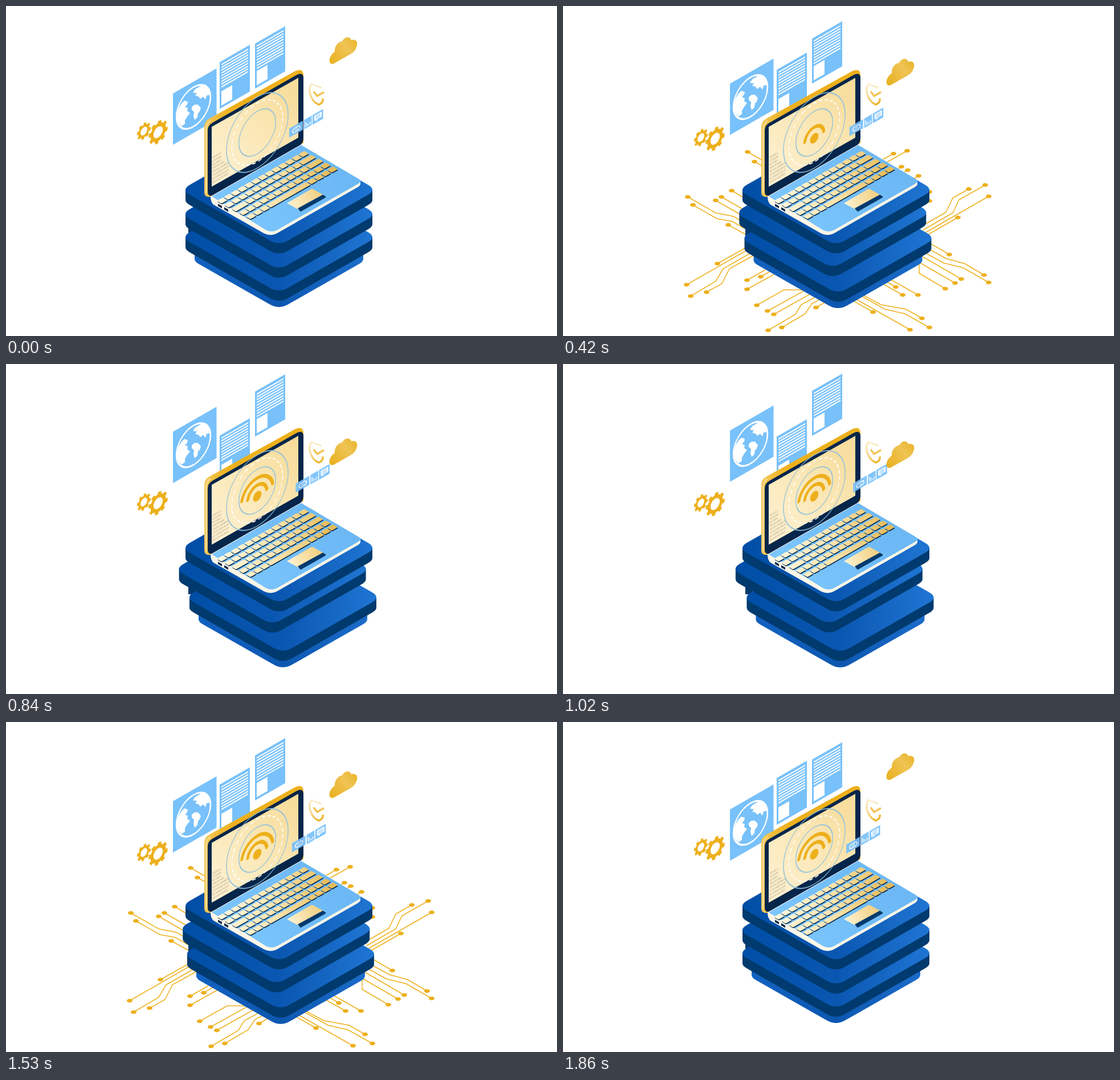
Write an HTML page that moves like this. It is 967x579 px and loops after 1890 ms.

```html
<!DOCTYPE html>
<html lang="en">
<head>
<meta charset="utf-8">
<title>Isometric laptop</title>
<style>
  html, body { margin: 0; width: 100%; height: 100%; overflow: hidden; background: #fff; }
  svg { display: block; width: 967px; height: 579px; }
  .code { font: 5px "Liberation Mono", "DejaVu Sans Mono", monospace; fill: #a89d80; }
</style>
</head>
<body>
<svg id="stage" viewBox="0 0 967 579" xmlns="http://www.w3.org/2000/svg"></svg>
<script>
const LOOP = 1890, STEP = 30, PEAK = 960, END = 1860;
const GOLD = '#edb01c', SKY = '#78c1fa', NAVY = '#003a6e', INK = '#05254a';
const ISO = 'matrix(.866 -.5 0 1 ';   // upright plane facing left

const range = n => [...Array(n).keys()];
const group = (id, body) => `<g id="${id}">${body}</g>`;
const path = (d, fill, more = '') => `<path d="${d}" fill="${fill}" ${more}/>`;
const line = (d, color, width, more = '') =>
  path(d, 'none', `stroke="${color}" stroke-width="${width}" ${more}`);
const rect = (x, y, w, h, fill) =>
  `<rect x="${x}" y="${y}" width="${w}" height="${h}" fill="${fill}"/>`;
const iso = (x, y, body) => `<g transform="${ISO}${x} ${y})">${body}</g>`;
const slant = (x, y, body) => `<g transform="matrix(1 -.574 0 1 ${x} ${y})">${body}</g>`;
const ring = (r, color, width, more = '') =>
  `<circle r="${r}" fill="none" stroke="${color}" stroke-width="${width}" ${more}/>`;

function gradient(id, x1, y1, x2, y2, ...colors) {
  const stops = colors.map((c, i) =>
    `<stop offset="${i / (colors.length - 1)}" stop-color="${c}"/>`).join('');
  return `<linearGradient id="${id}" gradientUnits="userSpaceOnUse" x1="${x1}" y1="${y1}" x2="${x2}" y2="${y2}">${stops}</linearGradient>`;
}

const defs = '<defs>' +
  gradient('face', 316, 0, 644, 0, '#004ea6', '#0a57b2', '#2075d3') +
  gradient('foot', 331, 0, 627, 0, '#1261c0', '#0d57b0', '#1c6cca') +
  gradient('screen', 361, 300, 513, 150, '#fdf1d2', '#fbe8b8', '#f7dc9b') +
  gradient('lid', 348, 0, 400, 0, '#f3c95c', '#efb933', GOLD) +
  gradient('deck', 400, 380, 560, 260, '#7cc6fd', '#6cb8f5') +
  gradient('keys', 380, 0, 570, 0, '#fff6dc', '#f9e3ad', '#e6bb58') +
  gradient('pad', 494, 350, 556, 322, '#fff3d2', '#eecb79') +
  gradient('cloud', 568, 98, 614, 62, '#e9b120', '#ecba3a', '#efc455', '#eab72f') +
  gradient('shield', 535, 136, 552, 174, '#fbeecb', '#f5d890', GOLD) +
  '</defs>';

// Rounded rhombus face on a side wall of height t.
function slab(cy, t, w, h, face, side) {
  const c = 479, r = 16, k = r * h / w, l = c - w, e = c + w;
  const top = `M${l + r},${cy + k}Q${l},${cy} ${l + r},${cy - k}L${c - r},${cy - h + k}` +
    `Q${c},${cy - h} ${c + r},${cy - h + k}L${e - r},${cy - k}Q${e},${cy} ${e - r},${cy + k}` +
    `L${c + r},${cy + h - k}Q${c},${cy + h} ${c - r},${cy + h - k}Z`;
  const b = cy + t, m = r / 2;
  const wall = `M${l + m},${cy}V${b}Q${l + m},${b + k / 2} ${l + r},${b + k}L${c - r},${b + h - k}` +
    `Q${c},${b + h} ${c + r},${b + h - k}L${e - r},${b + k}Q${e - m},${b + k / 2} ${e - m},${b}V${cy}Z`;
  return path(wall, side) + path(top, face);
}
const plate = cy => slab(cy, 18, 172, 98, 'url(#face)', NAVY);

// Each wire starts with its terminal dot.
const westWires = ['219,335 268,363 299,369 314,378', '228,349 270,373 297,378 320,391',
  '268,341 322,372', '278,335 322,360', '296,324 322,339', '290,384 328,405',
  '324,256 352,272', '336,273 352,282'];
const southWestWires = ['217,489 332,423', '224,509 268,483 281,461 332,432',
  '252,502 279,487 292,461 334,438', '271,452 328,420', '323,481 355,463', '347,475 368,463',
  '323,497 388,461', '340,525 388,498 428,498', '359,535 428,497', '370,541 438,503',
  '360,569 408,541 418,524 448,508', '384,564 425,540 437,522 460,510', '444,529 465,517'];
const southEastWires = ['544,537 505,515', '609,568 510,512', '643,564 600,540 565,532 522,508',
  '630,548 602,532 558,524 526,507', '623,507 568,476', '596,507 552,482', '584,493 560,479',
  '671,496 625,469 625,446', '688,486 622,448', '699,479 628,438',
  '747,485 702,459 668,451 630,430', '739,472 705,452 672,443 636,423', '678,436 640,414'];
const northEastWires = ['747,334 630,401', '741,314 695,340 684,363 632,393',
  '712,321 684,337 672,362 630,386', '693,371 632,406', '604,254 556,281', '580,259 542,280',
  '594,282 580,290', '605,288 590,297', '624,298 606,308', '643,326 630,333', '643,342 630,349'];

function wire(points) {
  const [x, y] = points.split(/[ ,]/);
  return line('M' + points, GOLD, 1.5) + `<ellipse cx="${x}" cy="${y}" rx="5" ry="3.3" fill="${GOLD}"/>`;
}

function gear(x, y, r) {
  const teeth = range(8).map(i =>
    `<rect x="${-r * .18}" y="${-r}" width="${r * .36}" height="${r * .4}" fill="${GOLD}" transform="rotate(${i * 45 + 10})"/>`);
  return iso(x, y, ring(r * .65, GOLD, r * .32) + teeth.join(''));
}

function page(x, y, h) {
  const rows = range(9).map(i => rect(3, 5 + i * 4.9, 47, 2.2, '#fff')).join('');
  return slant(x, y, rect(0, 0, 53, h, SKY) + rows + rect(3, h - 29, 19, 25, '#fff'));
}

const globe = slant(293, 153.5, rect(0, 0, 76.5, 90, SKY)) +
  iso(329, 177, ring(34.5, '#fff', 3)) +
  path('M299,190L303,179 308,171 313,166 319,168 318,173 314,177 319,179 318,184 323,188 318,194 314,201 314,207 308,211Q299,204 299,190Z' +
    'M328,152L332,146 342,140 350,138Q358,145 357,156L352,157 350,164 346,159 341,163 338,159 332,157 335,153Z' +
    'M326,177L331,173 337,173 342,179 340,185 337,188 336,195 331,200 329,193 330,186 326,182Z', '#fff');

const lid =
  path('M348,327V212Q348,203 356,198L508,114Q522,108 522,122V240L364,334Q348,338 348,327Z', 'url(#lid)') +
  line('M351.5,328V214Q352,206 359,201', '#fbe9bd', 1.5) +
  path('M354,325V218Q354,210 362,205L510,121Q522,115 522,127V232Q522,241 514,246L364,332Q354,336 354,325Z', INK) +
  path('M361,212L513,126V231L361,317Z', 'url(#screen)');

const bits = ['101011', '110100', '011001', '10010100', '10101100010', '11010001010', '01100010110', '01010101001']
  .map((s, i) => iso(362, 268 + i * 6.2, `<text class="code">${s}</text>`)).join('');

const rings = iso(441, 222,
  ring(62.4, '#8fc0dd', 1.8, 'opacity=".85"') +
  ring(51.5, '#fff', 1.8, 'stroke-dasharray="7 5"') +
  ring(37.3, '#93c3da', 1.8, 'opacity=".9"'));

function arc(r, deg) {
  const a = deg * Math.PI / 180, x = r * Math.cos(a), y = -r * Math.sin(a);
  return iso(441, 232, line(`M${-x},${y}A${r},${r} 0 0 1 ${x},${y}`, GOLD, 6, 'stroke-linecap="round"'));
}
const wifi = group('dot', iso(441, 232, `<circle r="8.5" fill="${GOLD}"/>`)) +
  group('inner', arc(19.5, 8)) + group('outer', arc(32, 12));

// Key widths per row, counted in units.
const ones = n => Array(n).fill(1);
const keyRows = [ones(13), [...ones(11), 2], [2, ...ones(9), 2], ones(13), [...ones(3), 6, ...ones(4)]];
function keyboard() {
  let out = '';
  keyRows.forEach((row, r) => {
    let n = 0;
    for (const w of row) {
      const x = 371.5 + r * 12.7 + n * 11.9, y = 341 + r * 6.8 - n * 6.8;
      const u = w * 11.9 - 4, k = u * .571;
      const d = `l${u},${-k}q1.2,-.4 2.4,.2l5.4,3.1q1.5,1 0,1.8l${-u},${k}q-1.2,.5 -2.4,0l-5.4,-3.3q-1.4,-1 0,-1.8z`;
      out += path(`M${x + .8},${y + 1.5}${d}`, INK) + path(`M${x},${y}${d}`, 'url(#keys)');
      n += w;
    }
  });
  return out;
}

const deck =
  path('M359,334L518,243 622,305V312Q622,315 617,318L477,398Q465,405 453,399L365,349Q359,345 359,334Z', '#fbf6e8') +
  path('M361,334L518,244 620,304Q625,308 618,312L476,393Q466,398 456,393Z', 'url(#deck)') +
  path('M372,347l7,4v4l-7,-4zM383,353l7,4v4l-7,-4z', INK) +
  keyboard() +
  path('M493,346L534,322Q537,320 540,322L560,333 517,359Z', 'url(#pad)') +
  path('M512,355L556,331 561,334V336L517,361Z', NAVY);

const strip = slant(497, 215,
  rect(0, 0, 24, 16, SKY) + rect(26, 0, 13.5, 16.5, SKY) + rect(41, 0, 18.5, 17, SKY) +
  '<rect x="6" y="5" width="13" height="7" rx="3.5" fill="none" stroke="#fff" stroke-width="1.5"/>' +
  rect(10, 8, 5, 1.2, '#fff') +
  [9, 6, 3, 5].map((h, i) => rect(28 + i * 2.7, 14 - h, 1.3, h, '#fff')).join('') +
  path('M44,3h13v9h-7l-3,3v-3h-3z', '#fff') +
  [5, 7.3, 9.6].map(y => rect(46, y, 9, 1, SKY)).join(''));

const shield =
  line('M538,136C531,140 532,151 535,158C538,166 544,171 549,173C554,171 557,167 556,162', 'url(#shield)', 3.4) +
  line('M537,136C541,142 548,139 553,144', 'url(#shield)', 2) +
  line('M540,150L546,158 558,151', GOLD, 3.4, 'opacity=".75"');

const cloud = path('M570,101C565,98 568,86 577,80C576,70 584,62 590,62C594,53 604,53 606,60C614,57 619,64 615,72C613,80 606,84 600,87L577,100C574,102 572,102 570,101Z', 'url(#cloud)');

document.getElementById('stage').innerHTML = defs +
  group('wires', [...westWires, ...southWestWires, ...southEastWires, ...northEastWires].map(wire).join('')) +
  path('M320,385H332V404H320Z', NAVY) +
  group('low', slab(419, 25, 156, 88.7, 'url(#foot)', 'url(#foot)') + plate(405.5)) +
  group('mid', plate(365)) +
  plate(322.5) +
  group('globe', globe) +
  group('pageA', page(375, 98.5, 82)) +
  group('pageB', page(437, 66, 79)) +
  lid + bits + rings + wifi + deck + shield +
  group('strip', `<g opacity=".92">${strip}</g>`) +
  group('cloudy', cloud) +
  group('gears', gear(242, 219.5, 14) + gear(267, 221.5, 19.3));

// Full travel of each floating part at the turning point.
const travel = {
  globe: [0, -39.4], pageA: [0, 31], pageB: [0, -20], gears: [0, 26],
  cloudy: [0, 86.5], strip: [13, -6], mid: [-13, -6], low: [8, 4.5]
};
const shown = {
  wires: [[240, 720], [1185, 1665]],
  dot: [[180, LOOP]], inner: [[360, LOOP]], outer: [[540, LOOP]]
};
const el = id => document.getElementById(id);

function draw(now) {
  const t = Math.floor(now % LOOP / STEP) * STEP;
  const p = t < PEAK ? t / PEAK : (END - t) / (END - PEAK);
  for (const [id, [x, y]] of Object.entries(travel))
    el(id).setAttribute('transform', `translate(${x * p} ${y * p})`);
  for (const [id, spans] of Object.entries(shown))
    el(id).setAttribute('visibility', spans.some(([a, b]) => t >= a && t < b) ? 'visible' : 'hidden');
}

const start = performance.now();
function tick() {
  draw(performance.now() - start);
  requestAnimationFrame(tick);
}
tick();
</script>
</body>
</html>
```
